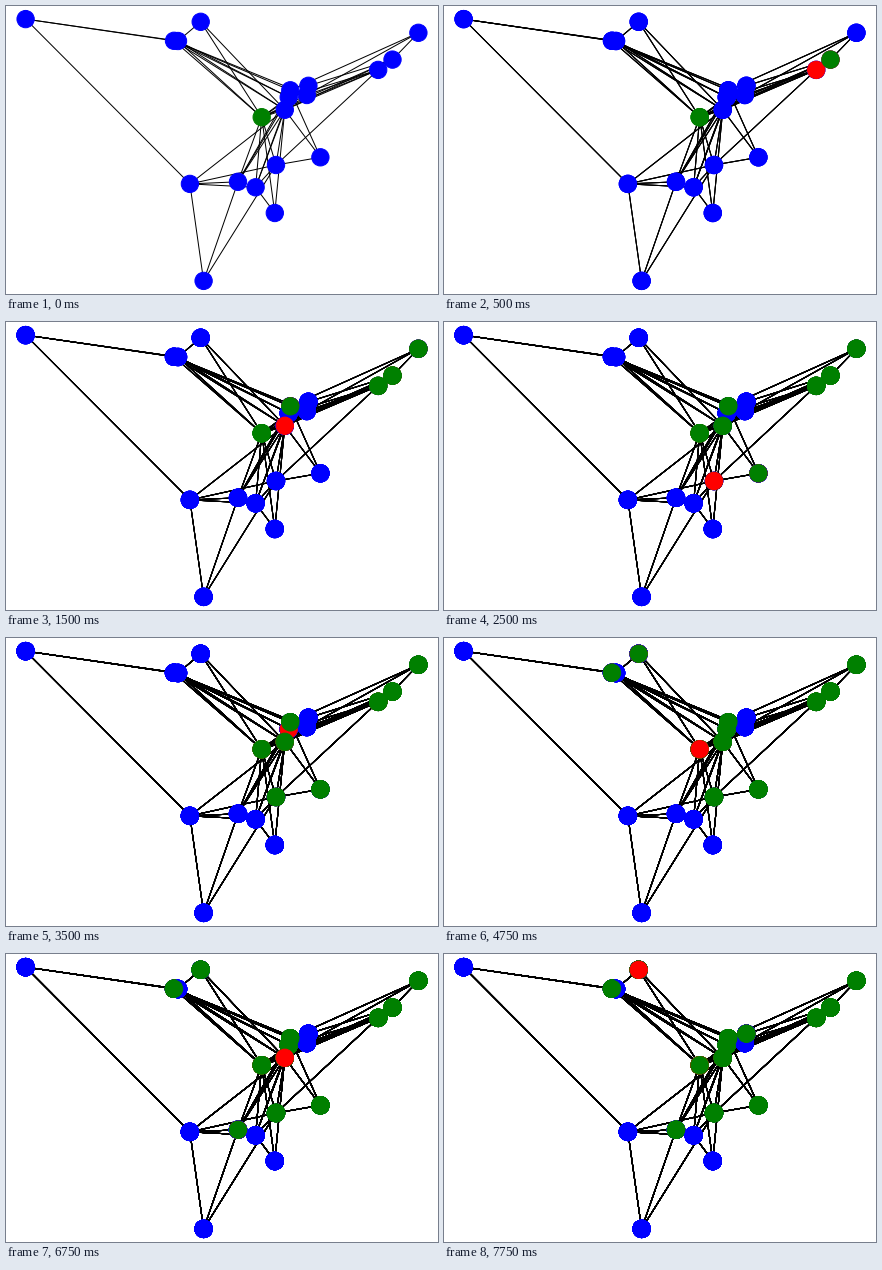
These frames come from a looping animation (432 px wide and 288 px high, 8000 ms). A matplotlib script:

```python
import matplotlib.pyplot as plt
from matplotlib.animation import FuncAnimation
from matplotlib.collections import LineCollection

W, H, DPI = 432, 288, 72
STEPS, STEP_MS = 32, 250

# Node centres in pixels, listed from back to front.
NODES = {
    "a": (19.6, 13.1), "c": (194.7, 15.8), "b": (172, 35), "B": (168, 34.8),
    "e": (282.7, 91.2), "g": (300.8, 89), "f": (302.4, 79.8),
    "d": (284.3, 84.3), "h": (278.8, 103.8), "s": (255.7, 111.2),
    "i": (372.2, 63.9), "j": (386.5, 53.6), "k": (412.4, 26.8),
    "l": (314.4, 151.3), "m": (270, 159), "n": (232, 175.8),
    "o": (249.6, 181.3), "p": (183.9, 177.9), "q": (268.8, 207),
    "r": (197.6, 274.9),
}

# Each node followed by its neighbours.
LINKS = """a:Bbp B:deghs b:ehsc c:sh k:jdg j:fhsi i:gehsm l:hdm
s:hefgmnoq h:deqnmop n:edp o:empq m:pr r:pn"""

# Node occupied at each step.
WALK = "sjijkdhsmlmishehsBcsdesBshnhsfsc"

edges = [(NODES[u], NODES[v])
         for u, ends in (item.split(":") for item in LINKS.split())
         for v in ends]
xs, ys = zip(*NODES.values())


def colors_at(step):
    """Blue is unvisited, green visited, red the current node."""
    seen = set(WALK[:step + 1])
    colors = ["green" if n in seen else "blue" for n in NODES]
    if step:
        colors[list(NODES).index(WALK[step])] = "red"
    return colors


fig = plt.figure(figsize=(W / DPI, H / DPI), dpi=DPI, facecolor="white")
ax = fig.add_axes([0, 0, 1, 1])
ax.set_xlim(0, W)
ax.set_ylim(H, 0)
ax.axis("off")

# The graph is painted again over itself at each step, so edges darken.
layers = []
for step in range(STEPS):
    lines = LineCollection(edges, colors="black", linewidths=1, zorder=1)
    ax.add_collection(lines, autolim=False)
    dots = ax.scatter(xs, ys, s=300, c=colors_at(step), linewidths=1,
                      edgecolors="face", zorder=2)
    layers.append((lines, dots))


def update(step):
    for i, layer in enumerate(layers):
        for artist in layer:
            artist.set_visible(i <= step)
    return [artist for layer in layers for artist in layer]


anim = FuncAnimation(fig, update, frames=STEPS, interval=STEP_MS,
                     repeat=True, repeat_delay=0)
plt.show()
```
